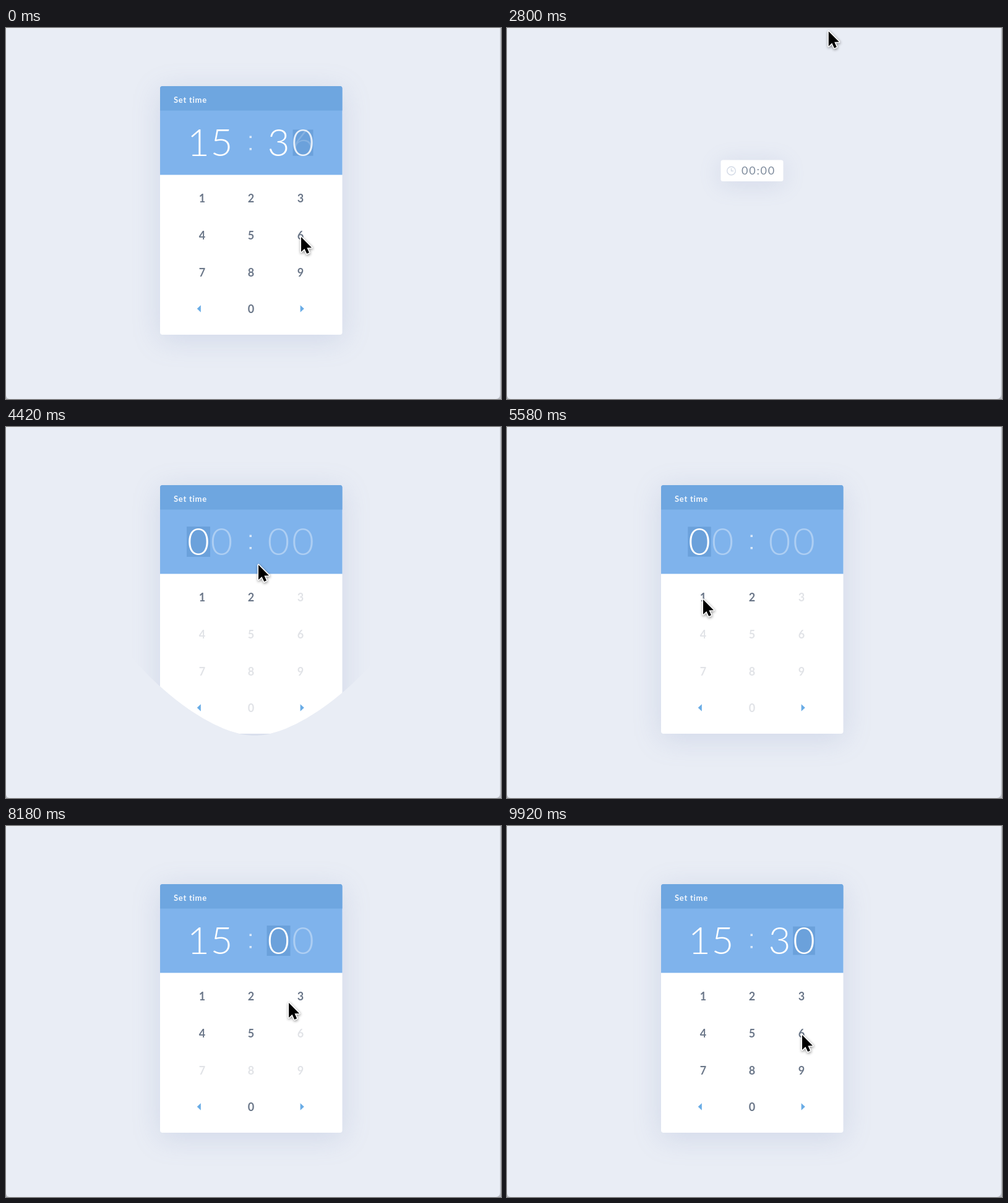
These frames come from a looping animation (800x600 px, 9.94 s). An HTML page with a canvas:

```html
<!DOCTYPE html>
<html lang="en">
<head>
<meta charset="utf-8">
<title>Set time</title>
<style>
  html, body { margin: 0; width: 100%; height: 100%; overflow: hidden; background: #e9edf5; }
  canvas { display: block; width: 800px; height: 600px; }
</style>
</head>
<body>
<canvas id="stage" width="800" height="600"></canvas>
<script>
const ctx = document.getElementById('stage').getContext('2d');
const LOOP = 9940;
const FONT = 'Lato, "Open Sans", sans-serif';

const CARD = { x: 249, y: 94, w: 294.5, h: 402 };
const PILL = { x: 345.5, y: 213.5, w: 101, h: 34.5 };
const SLOTS = [311, 348.5, 440.5, 480];
const ENTERED = '1536';
const PRESSES = [5560, 7250, 8540, 9880];
const ALLOWED = ['12', '0123456789', '012345', '0123456789'];
const PRESS_MS = 165;

// Pointer path: time, x, y
const PATH = [
  [1000, 640, -60], [2000, 600, -60], [2640, 550, -48], [2800, 520, 5],
  [3040, 456, 115], [3520, 381, 226], [4050, 381, 226], [4420, 408, 223],
  [4750, 398, 238], [5350, 317, 279], [6200, 317, 279], [6780, 377, 300],
  [7100, 396, 339], [7600, 396, 339], [8180, 457, 286], [8420, 476, 278],
  [8850, 476, 278], [9500, 477, 338], [10160, 477, 338], [10560, 549, 238],
  [10800, 662, -34], [10940, 662, -60]
];

const clamp = v => Math.max(0, Math.min(1, v));
const ramp = (t, start, ms) => clamp((t - start) / ms);
const mix = (a, b, u) => a + (b - a) * u;
const easeInOut = u => u < .5 ? 4 * u ** 3 : 1 - 4 * (1 - u) ** 3;
const easeOut = u => 1 - (1 - u) ** 2;

function slope(i, axis) {
  const a = PATH[i - 1], p = PATH[i], b = PATH[i + 1];
  if (!a || !b) return 0;
  const resting = q => q[1] === p[1] && q[2] === p[2];
  if (resting(a) || resting(b)) return 0;
  return (b[axis] - a[axis]) / (b[0] - a[0]);
}

function pointer(t) {
  let i = 0;
  while (i < PATH.length - 2 && t >= PATH[i + 1][0]) i++;
  const a = PATH[i], b = PATH[i + 1], d = b[0] - a[0];
  const u = clamp((t - a[0]) / d), u2 = u * u, u3 = u2 * u;
  return [1, 2].map(k =>
    (2 * u3 - 3 * u2 + 1) * a[k] + (u3 - 2 * u2 + u) * d * slope(i, k) +
    (3 * u2 - 2 * u3) * b[k] + (u3 - u2) * d * slope(i + 1, k));
}

function box({ x, y, w, h }, r, fill) {
  ctx.beginPath();
  ctx.roundRect(x, y, w, h, r);
  ctx.fillStyle = fill;
  ctx.fill();
}

function shadowed(draw, color, blur, dy, dx = 0) {
  ctx.save();
  ctx.shadowColor = color;
  ctx.shadowBlur = blur;
  ctx.shadowOffsetX = dx;
  ctx.shadowOffsetY = dy;
  draw();
  ctx.restore();
}

function label(text, x, y, font, fill, align = 'center', spacing = 0) {
  ctx.font = `${font} ${FONT}`;
  ctx.letterSpacing = spacing + 'px';
  ctx.textAlign = align;
  ctx.fillStyle = fill;
  ctx.fillText(text, x, y);
}

function polygon(points) {
  ctx.beginPath();
  points.forEach(([x, y]) => ctx.lineTo(x, y));
  ctx.closePath();
}

function drawBackdrop() {
  ctx.fillStyle = '#b9bcc3';
  ctx.fillRect(0, 0, 800, 600);
  box({ x: 0, y: 0, w: 798.6, h: 600 }, [0, 0, 7, 6], '#e9edf5');
  ctx.fillStyle = '#eef1f4';
  ctx.fillRect(0, 0, 798, 1);
}

function drawPill(t) {
  shadowed(() => box(PILL, 3.5, '#fff'), 'rgba(125,140,190,.2)', 36, 5);
  ctx.strokeStyle = '#d3dae6';
  ctx.lineWidth = 1.4;
  ctx.beginPath();
  ctx.arc(362.5, 231, 6.8, 0, Math.PI * 2);
  ctx.moveTo(362.5, 226.8);
  ctx.lineTo(362.5, 231.3);
  ctx.lineTo(366, 231.3);
  ctx.stroke();
  const reset = t > 10000 ? 0 : ramp(t, 1450, 160);
  const time = (text, alpha) => {
    ctx.globalAlpha *= alpha;
    label(text, 406.5, 237, '400 18px', '#7f8c9d', 'center', 1.7);
  };
  for (const [text, alpha] of [['15:36', 1 - reset], ['00:00', reset]]) {
    ctx.save();
    time(text, alpha);
    ctx.restore();
  }
}

function drawSelection(t) {
  SLOTS.forEach((x, i) => {
    const grow = i ? easeOut(ramp(t, PRESSES[i - 1] + PRESS_MS, 180)) : 1;
    const shrink = 1 - ramp(t, PRESSES[i], PRESS_MS) ** 2;
    const s = grow * shrink, w = 38 * s, h = 49 * s;
    if (s <= 0) return;
    ctx.fillStyle = '#6ba1db';
    ctx.fillRect(x - w / 2, 185.5 - h / 2, w, h);
  });
}

function drawDigits(t) {
  SLOTS.forEach((x, i) => {
    const active = i ? ramp(t, PRESSES[i - 1] + PRESS_MS, 180) : 1;
    const swap = ramp(t, PRESSES[i] + 40, 120);
    const base = mix(.36, 1, active);
    const digit = (text, alpha) => {
      if (alpha > 0) label(text, x, 207, '300 62px', `rgba(255,255,255,${alpha})`);
    };
    digit('0', base * (1 - swap));
    digit(ENTERED[i], swap);
  });
  ctx.fillStyle = 'rgba(255,255,255,.7)';
  ctx.fillRect(393.5, 174.5, 3.5, 3.5);
  ctx.fillRect(393.5, 194, 3.5, 3.5);
}

function keyStrength(key, t) {
  const on = i => ALLOWED[i].includes(key) ? 1 : 0;
  return PRESSES.slice(0, 3).reduce(
    (v, p, i) => mix(v, on(i + 1), ramp(t, p + PRESS_MS, 200)), on(0));
}

function drawKeys(t) {
  const rows = [282, 342, 402, 461], cols = [317, 396, 476];
  [...'1234567890'].forEach((key, i) => {
    const col = key === '0' ? 1 : i % 3, row = Math.floor(i / 3);
    const k = keyStrength(key, t);
    const rgb = [[225, 107], [227, 119], [231, 137]].map(([a, b]) => Math.round(mix(a, b, k)));
    label(key, cols[col], rows[row], '700 18px', `rgb(${rgb})`);
  });
  ctx.fillStyle = '#69ace6';
  polygon([[308.8, 454], [314.8, 448.3], [314.8, 459.7]]);
  ctx.fill();
  polygon([[481.8, 454], [475.6, 448.3], [475.6, 459.7]]);
  ctx.fill();
}

function drawCard(t) {
  shadowed(() => box(CARD, 4, '#fff'), 'rgba(125,140,190,.22)', 46, 8);
  box({ ...CARD, h: 143.5 }, [4, 4, 0, 0], '#7fb3ec');
  box({ ...CARD, h: 39.5 }, [4, 4, 0, 0], '#6ea6e0');
  label('Set time', 271, 120.5, '700 13px', '#f4f8fd', 'left', .75);
  drawSelection(t);
  drawDigits(t);
  drawKeys(t);
}

// Soft diamond that uncovers the card
function clipBlob(r) {
  const k = r * .37, cx = 402, cy = 231;
  ctx.beginPath();
  ctx.moveTo(cx + r, cy);
  ctx.bezierCurveTo(cx + r, cy + k, cx + k, cy + r, cx, cy + r);
  ctx.bezierCurveTo(cx - k, cy + r, cx - r, cy + k, cx - r, cy);
  ctx.bezierCurveTo(cx - r, cy - k, cx - k, cy - r, cx, cy - r);
  ctx.bezierCurveTo(cx + k, cy - r, cx + r, cy - k, cx + r, cy);
  ctx.clip();
}

function drawPointer(t) {
  const [x, y] = pointer(t);
  ctx.save();
  ctx.translate(x, y);
  polygon([[0, 0], [0, 24], [5.4, 18.9], [9.2, 27], [13, 25.3], [9.4, 17.4], [17, 17.2]]);
  ctx.lineJoin = 'round';
  ctx.lineWidth = 3.2;
  ctx.strokeStyle = '#fff';
  shadowed(() => ctx.stroke(), 'rgba(0,0,0,.45)', 4, 1.5, .5);
  ctx.fillStyle = '#000';
  ctx.fill();
  ctx.restore();
}

function render(clock) {
  const t = clock < 1000 ? clock + LOOP : clock;
  const open = easeInOut(ramp(t, 4110, 500)) * (1 - easeInOut(ramp(t, 10110, 430)));
  drawBackdrop();
  if (open < 1) {
    ctx.save();
    ctx.globalAlpha = 1 - clamp(open * 4);
    if (ctx.globalAlpha > 0) drawPill(t);
    ctx.restore();
  }
  if (open > 0) {
    ctx.save();
    if (open < 1) clipBlob(open * 342);
    drawCard(t);
    ctx.restore();
  }
  drawPointer(t);
}

const start = performance.now();
function tick() {
  render((performance.now() - start) % LOOP);
  requestAnimationFrame(tick);
}
tick();
</script>
</body>
</html>
```
